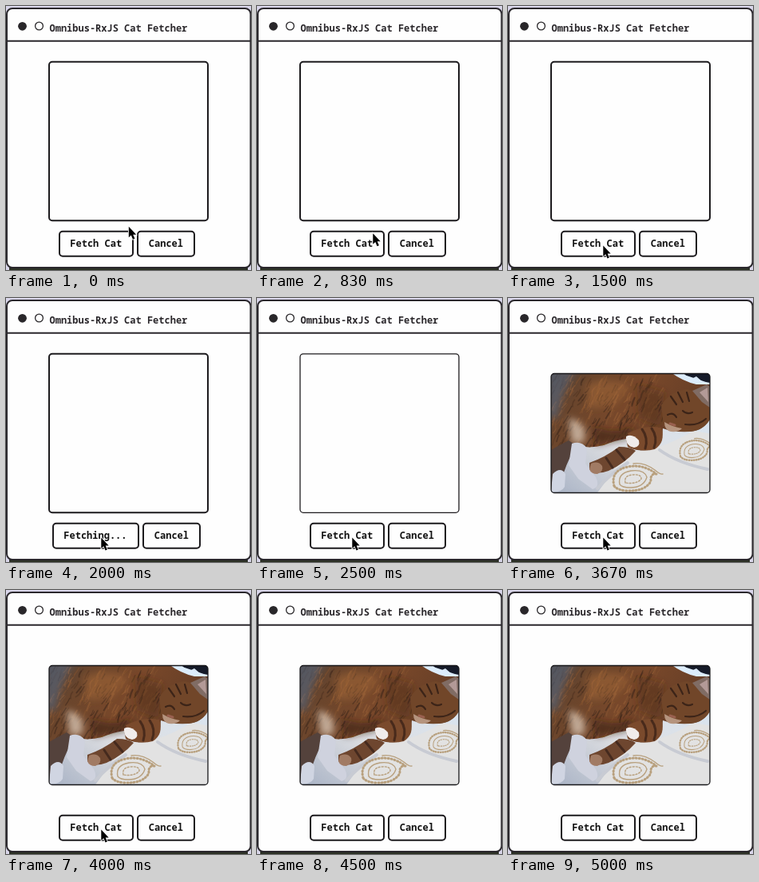
Animation, 307 px wide and 330 px high, one loop 5.17 s. Source, as an HTML page:

```html
<!DOCTYPE html>
<html lang="en">
<head>
<meta charset="utf-8">
<title>Cat Fetcher</title>
<style>
  html, body { margin: 0; width: 100%; height: 100%; overflow: hidden; background: #d9d6ea; }
  svg { display: block; }
  text { font: 700 12px "Noto Sans Mono", "DejaVu Sans Mono", monospace; fill: #111; white-space: pre; }
  .title { font-weight: 600; fill: #2a272b; }
  .box { fill: #fefefe; stroke: #1d1b1e; stroke-width: 2; }
  .line { fill: none; stroke-linecap: round; stroke-linejoin: round; }
</style>
</head>
<body>
<svg width="307" height="330" viewBox="0 0 307 330">
  <defs>
    <clipPath id="photoClip"><rect x="54" y="94.5" width="199" height="149" rx="4"/></clipPath>
    <clipPath id="bodyClip"><path id="body" d="M50 90H200Q218 104 236 108L253 108V150Q246 166 228 167Q206 168 194 163Q194 180 184 188Q166 194 150 186L148 176Q134 178 120 184Q96 190 78 181L70 198Q64 212 50 216Z"/></clipPath>
    <linearGradient id="cloth" x1="0" y1="1" x2="1" y2="0">
      <stop offset="0" stop-color="#a3aec2"/><stop offset=".4" stop-color="#dedfe2"/><stop offset="1" stop-color="#d6e6f6"/>
    </linearGradient>
    <linearGradient id="fur" x1="0" y1="0" x2="1" y2=".4">
      <stop offset="0" stop-color="#48423f"/><stop offset=".25" stop-color="#6a452c"/><stop offset=".55" stop-color="#79482a"/><stop offset="1" stop-color="#623c26"/>
    </linearGradient>
    <filter id="soft"><feGaussianBlur stdDeviation="0.6"/></filter>
    <filter id="haze"><feGaussianBlur stdDeviation="4"/></filter>
  </defs>

  <rect x="4" y="327" width="299" height="3" fill="#2b3024"/>
  <rect x="1" y="3" width="305.5" height="324" rx="7" fill="#fefefe" stroke="#2b282d" stroke-width="2"/>
  <path d="M1 43.8H306" stroke="#2b282d" stroke-width="2"/>
  <circle cx="20.5" cy="25.3" r="5.4" fill="#29272a"/>
  <circle cx="41.5" cy="25" r="4.9" fill="none" stroke="#29272a" stroke-width="1.3"/>
  <text class="title" x="54.5" y="32">Omnibus-RxJS Cat Fetcher</text>

  <rect id="frame" class="box" x="54" y="69.8" width="199" height="198.5" rx="4"/>
  <g id="photo">
    <g clip-path="url(#photoClip)">
      <rect x="50" y="90" width="210" height="160" fill="url(#cloth)"/>
      <g filter="url(#soft)">
        <path d="M218 92H256V106L244 105L236 98L228 102Z" fill="#161b29"/>
        <path d="M198 95L222 100L252 110" class="line" stroke="#dcecfb" stroke-width="7"/>
        <path d="M150 192Q190 192 232 166L256 170V246H110Z" fill="#e2e2e2"/>
        <path d="M190 190Q212 206 250 214M112 238Q128 220 150 206" class="line" stroke="#c8cbd3" stroke-width="4"/>
        <use href="#body" fill="url(#fur)"/>
        <g id="strands" class="line" clip-path="url(#bodyClip)"></g>
      </g>
      <g filter="url(#haze)" clip-path="url(#photoClip)">
        <path d="M98 108Q126 98 152 110L134 134L102 138Z" fill="#a5683a" opacity=".5"/>
        <path d="M76 150Q88 152 96 164L96 180L80 182Z" fill="#d3bfae" opacity=".8"/>
        <path d="M50 90H86Q70 108 62 150H50Z" fill="#59667a" opacity=".6"/>
        <path d="M106 160Q132 172 160 160L150 176L110 184Z" fill="#3a2115" opacity=".6"/>
        <path d="M162 108L196 118L190 160L164 150Z" fill="#4f2f1d" opacity=".45"/>
      </g>
      <g filter="url(#soft)">
        <path d="M54 190Q64 184 76 178L86 185Q76 200 70 218L64 238L54 242Z" fill="#54423c"/>
        <path d="M80 182Q92 178 99 188L97 207L110 224Q116 236 106 239L88 226L76 209Z" fill="#cfd2de"/>
        <path d="M56 220Q66 210 72 220L71 236Q66 244 54 242Z" fill="#d0d5e2"/>
        <path d="M102 206Q122 199 139 186Q154 186 160 191Q146 207 126 216Q109 222 102 214Z" fill="#6e462f"/>
        <path d="M104 207Q113 203 118 210Q120 217 112 220Q104 220 102 214Z" fill="#a17b64"/>
        <path d="M123 200L131 212M136 190L146 202" class="line" stroke="#452a1e" stroke-width="3"/>
        <path d="M150 169Q172 158 192 162Q198 180 184 189Q168 193 154 187Z" fill="#7a4a2c"/>
        <path d="M168 164Q176 175 172 188M180 163Q188 174 183 187" class="line" stroke="#482a1b" stroke-width="3"/>
        <path d="M148 173Q156 169 164 178Q166 186 158 187Q147 185 148 173Z" fill="#f0eceb"/>
        <path d="M192 134Q204 116 224 114L242 119L253 130V152Q244 167 224 167Q204 168 195 160Z" fill="#714629"/>
        <path d="M231 116L249 108L253 111V137L243 130Z" fill="#806c64"/>
        <path d="M240 118L250 112L251 130Z" fill="#b39a97"/>
        <path d="M196 155Q206 161 218 163Q214 168 204 167Q196 165 196 155Z" fill="#b5947e"/>
        <path d="M200 146Q207 142 211 149M219 141Q224 146 231 143M204 123L211 133M213 118L219 130M224 118L227 129M222 158Q238 160 248 151" class="line" stroke="#3c2418" stroke-width="2.2"/>
        <path d="M203 157L209 159" class="line" stroke="#99604f" stroke-width="3"/>
        <g id="paisley" class="line" stroke="#b8a07e" stroke-width="1.4">
          <path d="M133 235Q128 216 150 211Q169 207 186 220Q178 219 179 229Q172 242 148 241Q137 240 133 235Z" stroke-width="3" stroke-dasharray="1 3"/>
          <path d="M140 233Q137 219 154 216Q171 214 174 224Q170 237 153 237Q143 237 140 233Z"/>
          <path d="M147 231Q145 222 156 221Q167 220 167 226Q162 233 147 231Z" stroke-dasharray="2 2"/>
          <path d="M157 207Q170 205 184 215Q191 221 194 220"/>
        </g>
        <use href="#paisley" transform="translate(119 10) scale(.73 .8)"/>
      </g>
    </g>
    <rect x="54" y="94.5" width="199" height="149" rx="4" fill="none" stroke="#17171a" stroke-width="1.3"/>
  </g>

  <g id="buttons">
    <rect id="fetchBox" class="box" y="281.7" height="31" rx="4"/>
    <text id="fetchText" y="301"></text>
    <rect id="cancelBox" class="box" y="281.7" width="71" height="31" rx="4"/>
    <text id="cancelText" y="301">Cancel</text>
  </g>
  <circle id="ring" cx="119" cy="299.5" r="22" fill="#888" fill-opacity=".15" stroke="#555" stroke-opacity=".65" stroke-width="2.5"/>
  <path id="cursor" d="M0 0V13.4L3 10.7L5.2 16L7.6 15L5.4 9.9H9.4Z" fill="#000" stroke="#fff" stroke-width="1.6" paint-order="stroke"/>
</svg>
<script>
const LOOP = 5170;
const $ = id => document.getElementById(id);
const set = (id, attrs) => Object.entries(attrs).forEach(([k, v]) => $(id).setAttribute(k, v));
const show = (id, on) => set(id, { visibility: on ? "visible" : "hidden" });

// [start ms, tip x, tip y]
const moves = [
  [0, 153.8, 275.8], [830, 145.3, 284.3], [1000, 133.8, 295], [1170, 128.3, 298],
  [1330, 120.3, 299.5], [1500, 119.3, 299.5], [4170, 119.3, 303]
];

// Short curved strands give the fur its tabby texture.
let seed = 7;
const rand = () => (seed = (seed * 16807) % 2147483647) / 2147483647;
const tones = ["#352219", "#4d301f", "#83522f", "#996239"];
let strands = "";
for (let i = 0; i < 320; i++) {
  const x = 52 + rand() * 145, y = 94 + rand() * 92;
  const band = Math.sin(x / 6 + y / 14) + rand() - 0.5;
  const tone = tones[(band > 0 ? 2 : 0) + (rand() > 0.5 ? 1 : 0)];
  strands += `<path d="M${x} ${y}q${-1 - rand() * 3} 4 ${-2 - rand() * 4} ${5 + rand() * 5}" stroke="${tone}" stroke-width="${0.8 + rand() * 1.2}" opacity=".5"/>`;
}
$("strands").innerHTML = strands;

function draw(t) {
  const busy = t >= 1830 && t < 2500;
  const loaded = t >= 3670;
  const left = busy ? 59 : 67;
  const width = busy ? 107 : 92;
  const cancel = left + width + 6;
  set("fetchBox", { x: left, width });
  set("fetchText", { x: left + 13.3 });
  $("fetchText").textContent = busy ? "Fetching..." : "Fetch Cat";
  set("cancelBox", { x: cancel });
  set("cancelText", { x: cancel + 13.8 });

  $("frame").style.strokeWidth = t < 2500 ? 2 : 1.3;
  show("frame", !loaded);
  show("photo", loaded);
  show("ring", t >= 1670 && t < 1830);

  const [, x, y] = moves.findLast(m => m[0] <= t);
  set("cursor", { transform: `translate(${x} ${y})` });
  show("cursor", t < 4330);
}

const start = performance.now();
function tick() {
  draw((performance.now() - start) % LOOP);
  requestAnimationFrame(tick);
}
tick();
</script>
</body>
</html>
```
